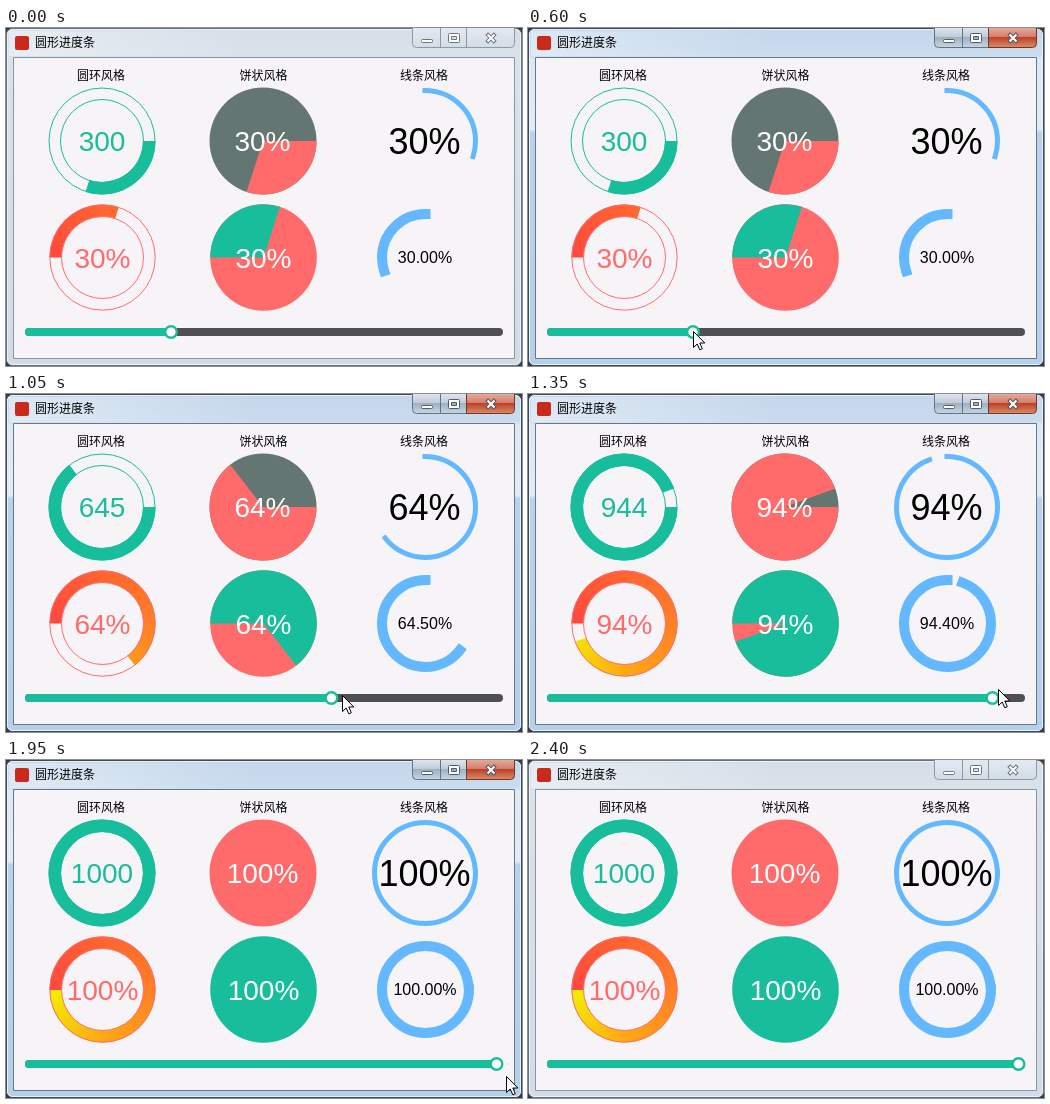
Animation of 516 by 338 pixels, one loop 2550 ms. Source, as an HTML page with a canvas:

```html
<!DOCTYPE html>
<html lang="zh">
<head>
<meta charset="utf-8">
<title>圆形进度条</title>
<style>
html, body { margin: 0; width: 100%; height: 100%; overflow: hidden; background: #f7f4f8; }
canvas { display: block; }
</style>
</head>
<body>
<canvas id="stage" width="516" height="338"></canvas>
<script>
const ctx = document.getElementById('stage').getContext('2d');
const TAU = Math.PI * 2;
const STEP = 150, LOOP = 2550;
const TEAL = '#18bd9b', CORAL = '#ff6b6b', SLATE = '#647671', BLUE = '#64b8ff', PAPER = '#f7f4f8';
const LATIN = '"Liberation Sans", Arial, sans-serif';
const HAN = '"Noto Sans CJK SC", "Noto Sans CJK", sans-serif';

// Slider value while dragging, starting at DRAG steps
const DRAG = 4;
const values = [30, 38, 50.5, 64.5, 80, 94.4, 100];
// Pointer tip on each step from DRAG - 1 onward
const pointer = [[166, 308], [165, 303], [203, 302], [268, 302], [336, 301],
  [404, 298], [470, 295], [494, 290], [491, 273], [497, 294], [500, 316]];

function vertical(y0, y1, stops) {
  const g = ctx.createLinearGradient(0, y0, 0, y1);
  stops.forEach(([at, color]) => g.addColorStop(at, color));
  return g;
}

function box(x, y, w, h, r, fill, line) {
  ctx.beginPath();
  ctx.roundRect(x, y, w, h, r);
  if (fill) { ctx.fillStyle = fill; ctx.fill(); }
  if (line) { ctx.lineWidth = 1; ctx.strokeStyle = line; ctx.stroke(); }
}

function text(str, x, y, size, color, font = LATIN, align = 'center') {
  ctx.font = `${size}px ${font}`;
  ctx.textAlign = align;
  ctx.fillStyle = color;
  ctx.fillText(str, x, y);
}

function circle(x, y, r, fill, line, width = 1) {
  ctx.beginPath();
  ctx.arc(x, y, r, 0, TAU);
  if (fill) { ctx.fillStyle = fill; ctx.fill(); }
  if (line) { ctx.lineWidth = width; ctx.strokeStyle = line; ctx.stroke(); }
}

function band(x, y, outer, inner, start, part, fill) {
  const end = start + TAU * part;
  ctx.beginPath();
  ctx.arc(x, y, outer, start, end);
  ctx.arc(x, y, inner, end, start, true);
  ctx.closePath();
  ctx.fillStyle = fill;
  ctx.fill();
}

function pie(x, y, r, start, part, base, fill) {
  if (part >= 1) return circle(x, y, r, fill);
  circle(x, y, r, base);
  ctx.beginPath();
  ctx.moveTo(x, y);
  ctx.arc(x, y, r, start, start + TAU * part);
  ctx.closePath();
  ctx.fillStyle = fill;
  ctx.fill();
}

function arcLine(x, y, r, width, part, reverse) {
  const top = -Math.PI / 2;
  ctx.beginPath();
  if (part >= 1) ctx.arc(x, y, r, 0, TAU);
  else ctx.arc(x, y, r, top, top + (reverse ? -1 : 1) * TAU * part, reverse);
  ctx.lineWidth = width;
  ctx.lineCap = 'square';
  ctx.strokeStyle = BLUE;
  ctx.stroke();
  ctx.lineCap = 'butt';
}

function buttons(active) {
  const edge = active ? '#66727f' : '#8d98a6';
  const plain = active
    ? vertical(0, 19, [[0, '#dde6ee'], [.45, '#c0ccd9'], [.5, '#9fb0c2'], [1, '#c3d4e4']])
    : vertical(0, 19, [[0, '#e3e9f0'], [1, '#d3dde8']]);
  const red = vertical(0, 19, [[0, '#e6a899'], [.45, '#d5806d'], [.5, '#bd4128'], [1, '#d98a62']]);
  box(406.5, -4, 54, 23.5, [0, 0, 0, 4], plain, edge);
  box(460.5, -4, 48, 23.5, [0, 0, 4, 0], active ? red : plain, active ? '#70352f' : edge);
  ctx.fillStyle = edge;
  ctx.fillRect(434, 0, 1, 19);

  const ink = active ? '#525b68' : '#6b7580';
  box(415.5, 11.5, 11, 3, 1, '#fff', ink);
  box(442.5, 5.5, 11, 9, 1, '#fff', ink);
  box(445.5, 8.5, 5, 3, 0, plain, ink);
  [[4, ink], [2, '#fff']].forEach(([w, color]) => {
    const reach = w === 4 ? 4.3 : 3.5;
    ctx.beginPath();
    ctx.moveTo(485 - reach, 10 - reach); ctx.lineTo(485 + reach, 10 + reach);
    ctx.moveTo(485 + reach, 10 - reach); ctx.lineTo(485 - reach, 10 + reach);
    ctx.lineWidth = w;
    ctx.strokeStyle = color;
    ctx.stroke();
  });
}

function chrome(active) {
  ctx.fillStyle = '#343b42';
  ctx.fillRect(0, 0, 516, 338);
  const glass = active
    ? vertical(0, 338, [[0, '#c3d7ec'], [.08, '#cadbed'], [.09, '#dce8f4'], [.3, '#e2ecf6'], [.31, '#b9d1ea'], [1, '#b7d0ea']])
    : vertical(0, 338, [[0, '#d5dee8'], [.09, '#dae2eb'], [.5, '#d5dfea'], [1, '#d0dce8']]);
  box(.5, .5, 515, 337, 6, glass, active ? '#3f4a56' : '#68727c');
  box(1.5, 1.5, 513, 335, 5, null, active ? '#e6f2fc' : '#edf2f7');

  const glow = ctx.createLinearGradient(8, 0, 250, 0);
  glow.addColorStop(0, 'rgba(255,255,255,.4)');
  glow.addColorStop(1, 'rgba(255,255,255,0)');
  ctx.fillStyle = glow;
  ctx.fillRect(3, 3, 247, 25);

  box(7.5, 29.5, 501, 301, 0, PAPER, active ? '#64788c' : '#8995a2');
  box(9, 8, 14, 14, 2, '#c92a1c');
  text('圆形进度条', 29, 19, 12, '#000', HAN, 'left');
  buttons(active);
}

function gauges(v) {
  const part = v / 100;
  const percent = Math.floor(v) + '%';
  ['圆环风格', '饼状风格', '线条风格'].forEach((s, i) => text(s, [95, 257.5, 418][i], 51.5, 12, '#000', HAN));

  band(96, 113, 53.5, 41, 0, part, TEAL);
  circle(96, 113, 53, null, TEAL);
  circle(96, 113, 41.5, null, TEAL);
  text(Math.round(v * 10), 96, 123, 28, TEAL);

  const warm = ctx.createConicGradient(Math.PI, 96.5, 229.5);
  ['#ff4840', '#ff6430', '#ff7f27', '#ffa912', '#f0f000'].forEach((c, i) => warm.addColorStop(i / 4, c));
  band(96.5, 229.5, 53, 41, Math.PI, part, warm);
  circle(96.5, 229.5, 52.7, null, CORAL);
  circle(96.5, 229.5, 41, null, CORAL);
  text(percent, 96.5, 240, 28, CORAL);

  pie(257, 113, 53.5, 0, part, SLATE, CORAL);
  text(percent, 256.5, 123, 28, '#fff');
  pie(257.5, 229.5, 53.3, Math.PI, part, CORAL, TEAL);
  text(percent, 257.5, 240, 28, '#fff');

  arcLine(419, 113, 50.5, 5, part, false);
  text(percent, 418.5, 125.5, 36, '#000');
  arcLine(419.5, 229.5, 43.5, 10, part, true);
  text(v.toFixed(2) + '%', 419, 235, 16, '#000');
}

function slider(v) {
  const x = 25.5 + 4.65 * v;
  box(19, 300, 478, 8, 4, '#505052');
  box(19, 300, x - 19, 8, [4, 0, 0, 4], TEAL);
  circle(x, 304, 5.8, '#fff', TEAL, 2.4);
}

function arrow([x, y]) {
  const shape = [[0, 0], [0, 16], [3.7, 12.5], [6.3, 18.3], [8.8, 17.2], [6.3, 11.5], [11.3, 11.5]];
  ctx.beginPath();
  shape.forEach(([dx, dy]) => ctx.lineTo(x + .5 + dx, y + .5 + dy));
  ctx.closePath();
  ctx.fillStyle = '#fff';
  ctx.fill();
  ctx.lineWidth = 1;
  ctx.strokeStyle = '#000';
  ctx.stroke();
}

function draw(now) {
  const step = Math.floor((now % LOOP) / STEP);
  const v = values[Math.min(Math.max(step - DRAG, 0), values.length - 1)];
  const tip = pointer[step - DRAG + 1];
  chrome(step >= DRAG && step < 16);
  gauges(v);
  slider(v);
  if (tip) arrow(tip);
}

const begin = performance.now();
function tick() {
  draw(performance.now() - begin);
  requestAnimationFrame(tick);
}
tick();
</script>
</body>
</html>
```
